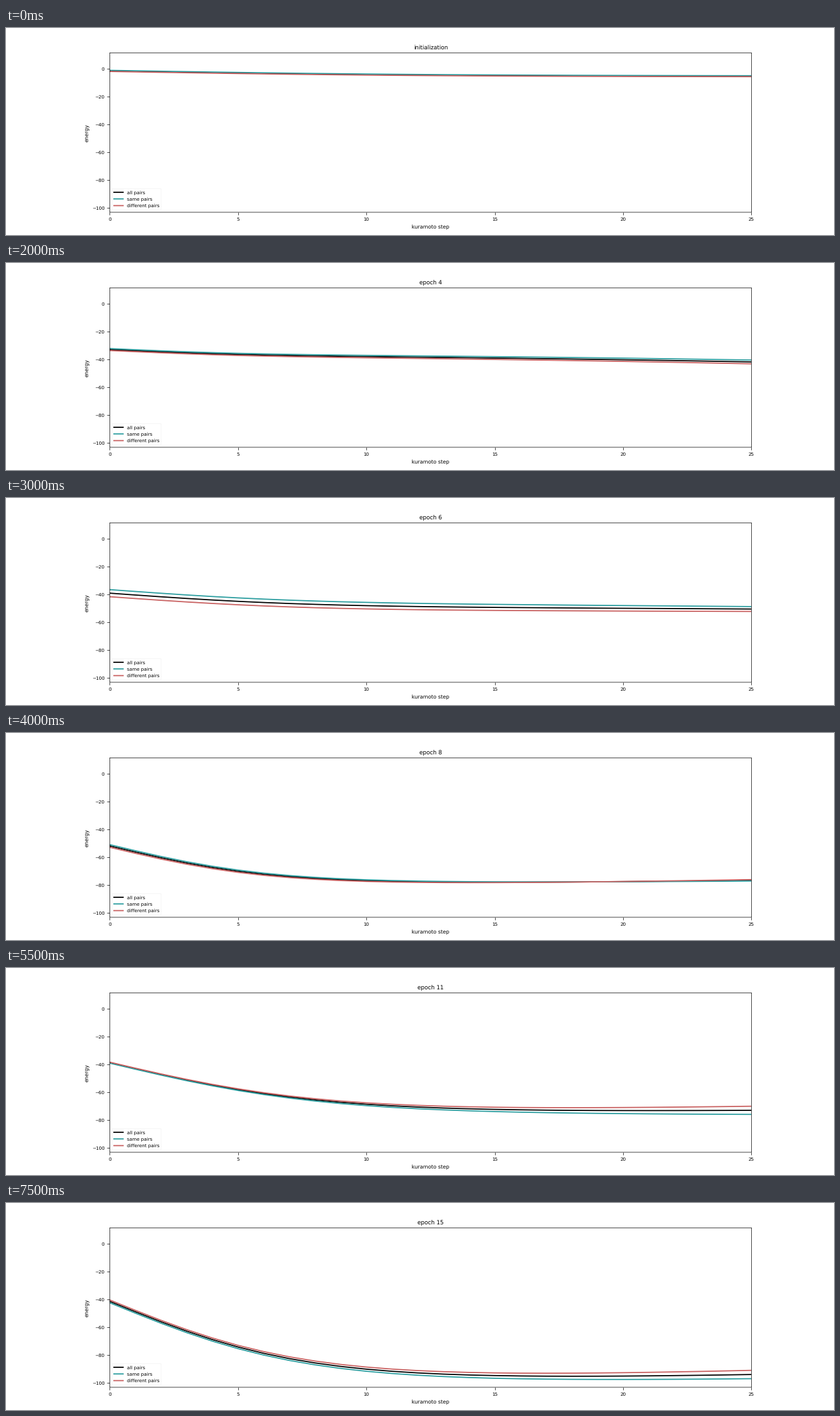
A matplotlib script that plays this animation: 1280x320 px, repeating every 8 s.

```python
import numpy as np
import matplotlib.pyplot as plt
from matplotlib.animation import FuncAnimation

plt.rcParams.update({
    "font.family": "DejaVu Sans",
    "font.size": 8,
    "axes.titlesize": 9.8,
    "axes.labelsize": 9,
    "xtick.major.size": 4,
    "ytick.major.size": 4,
    "xtick.major.pad": 5,
    "ytick.major.pad": 5,
    "lines.linewidth": 2,
    "path.snap": False,
    "text.hinting": "none",
})

EPOCHS, STEPS = 16, 25
STYLES = [
    ("all pairs", "black", 0),
    ("same pairs", "#2a9d9f", 1),
    ("different pairs", "#c96060", -1),
]

# Training history as key points {epoch: value}, linear in between.
START = {0: -1.5, 2: -8, 4: -32.9, 6: -39.1, 8: -51.9,
         10: -44.4, 13: -27.4, 15: -41.4}
END = {0: -5.3, 2: -13.8, 3: -37.8, 4: -41.8, 6: -50.5, 7: -80, 8: -76.6,
       10: -86.4, 11: -73, 13: -72.7, 14: -75.5, 15: -94}
RATE = {0: 0.08, 4: 0.18, 6: 0.13, 8: 0.16, 10: 0.118, 15: 0.132}
REBOUND = {0: 0, 4: -4.3, 6: -1.25, 8: 2.8, 10: 0.6, 13: 3.7, 15: 4.3}
GAP_START = {0: 0.4, 4: 0.7, 6: 2.55, 8: 0.95, 10: -0.2, 15: -1}
GAP_END = {0: 0.35, 4: 1.35, 6: 1.75, 8: -0.5, 10: -3.6, 13: -1.6, 15: -3}

steps = np.arange(STEPS + 1)


def at(keys, epoch):
    return np.interp(epoch, list(keys), list(keys.values()))


def energy(epoch):
    """Saturating fall from start to end, with a late quadratic rebound."""
    start, end = at(START, epoch), at(END, epoch)
    rate, rebound = at(RATE, epoch), at(REBOUND, epoch)
    fall = np.tanh(rate * steps) / np.tanh(rate * STEPS)
    return start + (end - start - rebound) * fall + rebound * (steps / STEPS) ** 2


def half_gap(epoch):
    first, last = at(GAP_START, epoch), at(GAP_END, epoch)
    return first + (last - first) * (steps / STEPS) ** 1.5


fig, ax = plt.subplots(figsize=(20, 5), dpi=64)
fig.subplots_adjust(left=160.4 / 1280, right=1152.4 / 1280,
                    bottom=1 - 284.9 / 320, top=1 - 38.6 / 320)
lines = [ax.plot(steps, 0 * steps, color=color, label=label)[0]
         for label, color, _ in STYLES]
ax.set(xlim=(0, STEPS), ylim=(-103.2, 11.4),
       xlabel="kuramoto step", ylabel="energy")
ax.legend(loc="lower left", edgecolor="0.95")
title = ax.set_title("")


def update(epoch):
    title.set_text(f"epoch {epoch}" if epoch else "initialization")
    mean, gap = energy(epoch), half_gap(epoch)
    for line, (_, _, side) in zip(lines, STYLES):
        line.set_ydata(mean + side * gap)
    return [title, *lines]


anim = FuncAnimation(fig, update, frames=EPOCHS, interval=500,
                     repeat=True, repeat_delay=0)
plt.show()
```
